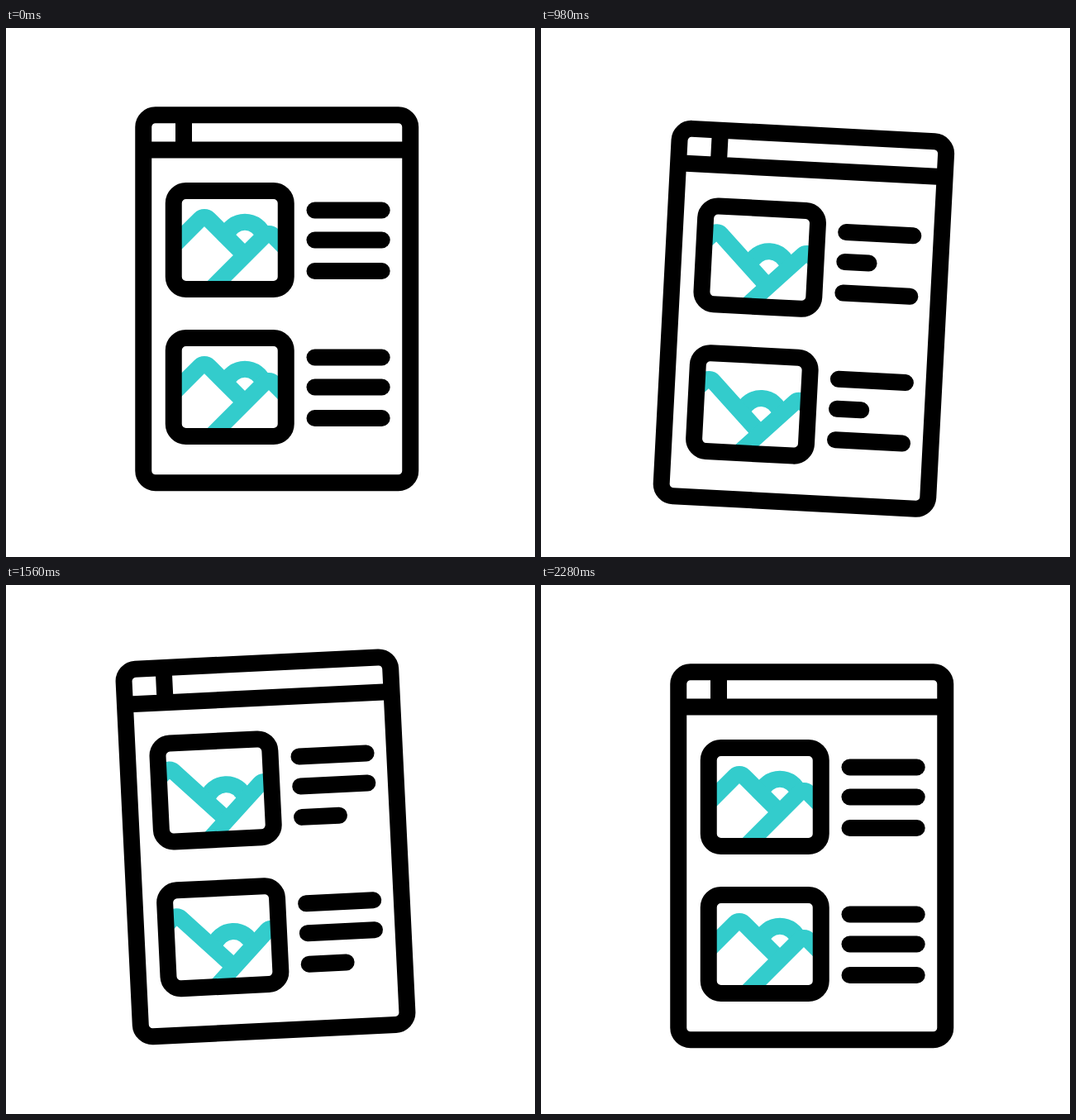
These frames come from a looping animation (640x640 px, 2.4 s). An HTML page:

```html
<!DOCTYPE html>
<html lang="en">
<head>
<meta charset="utf-8">
<title>Page layout icon</title>
<style>
  html, body { margin: 0; width: 100%; height: 100%; overflow: hidden; background: #fff; }
  svg { display: block; width: 100%; height: 100%; }
  .ink { fill: none; stroke: #000; stroke-width: 20; stroke-linecap: round; }
  .teal { fill: none; stroke: #3cc; stroke-width: 20; }
</style>
</head>
<body>
<svg viewBox="0 0 640 640">
  <defs>
    <clipPath id="window"><rect x="203" y="197" width="136" height="119" rx="15"/></clipPath>
    <g id="card">
      <g class="teal" clip-path="url(#window)">
        <path id="sun" d="M266 252A24 24 0 0 1 312 252"/>
        <path id="left" d="M170 296L235 231A7 7 0 0 1 245 231L289 275"/>
        <path id="right" d="M228 336L313 251A7 7 0 0 1 323 251L363 291"/>
      </g>
      <rect class="ink" x="202.75" y="197" width="136" height="119" rx="15"/>
      <g id="lines" class="ink"></g>
    </g>
  </defs>
  <g id="page">
    <path class="ink" style="stroke-linecap:butt" d="M166 147.5H489.5M215 105V147.5"/>
    <rect class="ink" x="166.25" y="105.25" width="323" height="445" rx="14.5"/>
    <use href="#card"/>
    <use href="#card" y="178"/>
  </g>
</svg>
<script>
const LOOP = 2400, CX = 327.8, CY = 327.7;
const $ = id => document.getElementById(id);
const clamp = v => Math.min(1, Math.max(0, v));
const smooth = u => u * u * (3 - 2 * u);
const linear = u => u;
const easeIn = c => u => u * u * (1 + c - c * u);
const reverse = ease => u => 1 - ease(1 - u);
const glide = easeIn(0.8), turn = easeIn(1.33);

// time, x, y, angle, then for the leg that follows: sideways bow, path and angle easing
const poses = [
  [40, 0, 0, 0, 3, glide, turn],
  [825, -12.4, 40.7, 6.28, 5.7, linear, linear],
  [1415, -19.5, -22.3, -6.1, 1.9, linear, linear],
  [1820, -8.4, 9.2, 3.1, 1, reverse(glide), reverse(turn)],
  [2280, 0, 0, 0]
];

// time, left peak x, right peak x, sun y
const scene = [
  [40, 0, 0, 0],
  [380, -10, 2.6, 5.5],
  [680, -18.5, 6.8, 10.3],
  [980, -22.7, 9.5, 13.7],
  [1380, -23.5, 11.3, 15],
  [1720, -24.5, 12, 15],
  [2280, 0, 0, 0]
];

const SHRINK = 52, HALF = 432;
const lines = [[220.5, 555], [256.5, 992], [294, 1403]].map(([y, mid]) => {
  const el = document.createElementNS('http://www.w3.org/2000/svg', 'path');
  $('lines').append(el);
  return { el, y, mid };
});

function legAt(keys, t) {
  let i = 0;
  while (i < keys.length - 2 && t >= keys[i + 1][0]) i++;
  return [i, clamp((t - keys[i][0]) / (keys[i + 1][0] - keys[i][0]))];
}

function poseAt(t) {
  const [i, u] = legAt(poses, t), a = poses[i], b = poses[i + 1];
  const [bow, path, spin] = a.slice(4), f = path(u);
  const mix = (k, v) => a[k] + (b[k] - a[k]) * v;
  return [mix(1, f) + 4 * bow * f * (1 - f), mix(2, f), mix(3, spin(u))];
}

// smooth curve through the keys, at rest at both ends and at the turn
function sceneAt(t) {
  const [i, u] = legAt(scene, t), a = scene[i], b = scene[i + 1];
  const span = b[0] - a[0], last = scene.length - 2;
  const slope = (j, k) => j === 0 || j >= last ? 0 :
    (scene[j + 1][k] - scene[j - 1][k]) / (scene[j + 1][0] - scene[j - 1][0]);
  return [1, 2, 3].map(k =>
    a[k] + (b[k] - a[k]) * smooth(u) +
    span * u * (1 - u) * (slope(i, k) * (1 - u) - slope(i + 1, k) * u));
}

const move = (id, x, y = 0) => $(id).setAttribute('transform', `translate(${x} ${y})`);

function draw(t) {
  const [x, y, angle] = poseAt(t);
  $('page').setAttribute('transform', `translate(${x} ${y}) rotate(${angle} ${CX} ${CY})`);

  const [left, right, sunY] = sceneAt(t);
  move('left', left);
  move('right', right);
  move('sun', (left + right) / 2, sunY);
  // keep the left slope reaching the right one as they part
  const foot = 289 + (right - left) / 2;
  $('left').setAttribute('d', `M170 296L235 231A7 7 0 0 1 245 231L${foot} ${foot - 14}`);

  for (const { el, y, mid } of lines) {
    const cut = SHRINK * smooth(clamp(1 - Math.abs(t - mid) / HALF));
    el.setAttribute('d', `M373.5 ${y}H${454.7 - cut}`);
  }
}

const start = performance.now();
function tick(now) {
  draw(Math.max(0, now - start) % LOOP);
  requestAnimationFrame(tick);
}
draw(0);
requestAnimationFrame(tick);
</script>
</body>
</html>
```
